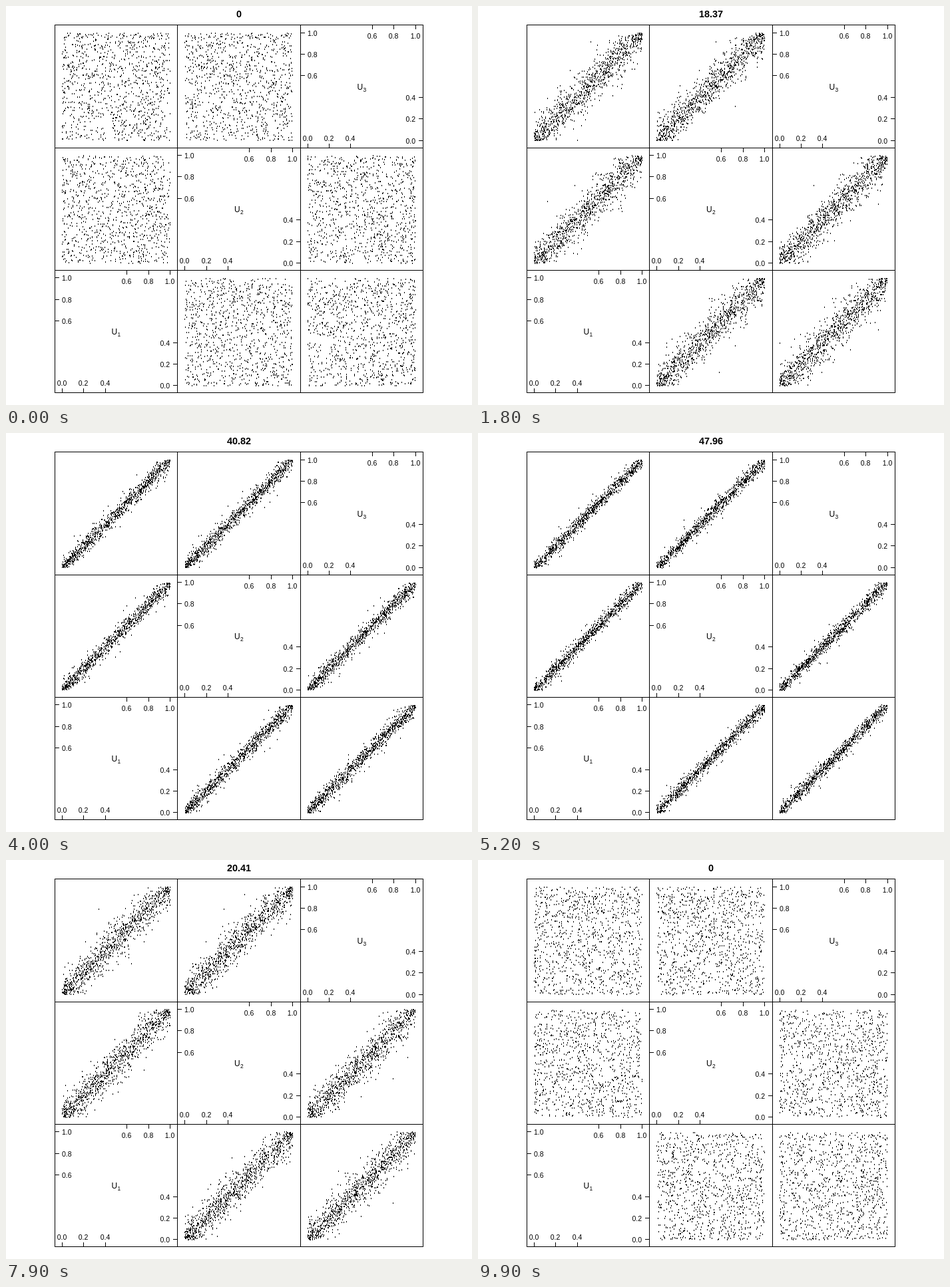
An HTML page with a canvas for the animation above (10000 ms loop, 700 px wide and 600 px high).

```html
<!DOCTYPE html>
<html>
<head>
<meta charset="utf-8">
<style>
  html, body { margin: 0; width: 100%; height: 100%; overflow: hidden; background: #fff; }
  canvas, svg { position: absolute; left: 0; top: 0; }
  text { font: 10.5px "Liberation Sans", Arial, sans-serif; }
  #title { font-size: 14.4px; font-weight: bold; text-anchor: middle; }
  .name { font-size: 12px; }
  .sub { font-size: 8.4px; }
  path { stroke: #000; stroke-linecap: square; fill: none; shape-rendering: crispEdges; }
</style>
</head>
<body>
<canvas width="700" height="600"></canvas>
<svg width="700" height="600"><path id="lines"/><text id="title" x="350" y="17"></text></svg>
<script>
const FRAMES = 100, POINTS = 1000, MAX_THETA = 50;
const LEFT = 73.4, TOP = 28.7, CELL = 184.35, SPAN = 161.9;
const svg = document.querySelector('svg');
const title = document.getElementById('title');
const ctx = document.querySelector('canvas').getContext('2d');

const edgeX = col => Math.floor(LEFT + CELL * col);
const edgeY = row => Math.floor(TOP + CELL * row);
const pixelX = (col, v) => Math.floor(LEFT + CELL * col + 11.1 + SPAN * v);
const pixelY = (row, v) => Math.floor(TOP + CELL * row + 11.5 + SPAN * (1 - v));

function addText(x, y, content, anchor = 'start', className = '') {
  const el = document.createElementNS(svg.namespaceURI, 'text');
  el.setAttribute('x', x);
  el.setAttribute('y', y);
  el.setAttribute('text-anchor', anchor);
  el.setAttribute('class', className);
  el.textContent = content;
  svg.append(el);
}

function drawGrid() {
  let d = '';
  const line = (x, y, dx, dy) => d += `M${x + 0.5} ${y + 0.5}l${dx} ${dy}`;

  for (let i = 0; i < 4; i++) {
    line(edgeX(i), edgeY(0), 0, edgeY(3) - edgeY(0));
    line(edgeX(0), edgeY(i), edgeX(3) - edgeX(0), 0);
  }
  for (let k = 0; k < 3; k++) {
    const row = 2 - k;
    const x0 = edgeX(k), x1 = edgeX(k + 1), y0 = edgeY(row), y1 = edgeY(row + 1);
    for (let i = 0; i < 6; i++) {
      const v = i / 5, label = v.toFixed(1);
      const x = pixelX(k, v), y = pixelY(row, v);
      if (i < 3) {
        line(x, y1, 0, -6);
        addText(x, y1 - 10, label, 'middle');
        line(x1, y, -6, 0);
        addText(x1 - 11, y + 4.5, label, 'end');
      } else {
        line(x, y0, 0, 6);
        addText(x, y0 + 21, label, 'middle');
        line(x0, y, 6, 0);
        addText(x0 + 11, y + 4.5, label);
      }
    }
    const cx = (x0 + x1) / 2, cy = (y0 + y1) / 2;
    addText(cx - 6.5, cy + 5, 'U', 'start', 'name');
    addText(cx + 2.5, cy + 8, k + 1, 'start', 'name sub');
  }
  document.getElementById('lines').setAttribute('d', d);
}

function seeded(seed) {
  let s = seed * 7919 + 12345;
  return () => {
    s = s + 0x6D2B79F5 | 0;
    let t = Math.imul(s ^ s >>> 15, 1 | s);
    t = t + Math.imul(t ^ t >>> 7, 61 | t) ^ t;
    return (((t ^ t >>> 14) >>> 0) + 0.5) / 2 ** 32;
  };
}

// One draw from a three-dimensional Frank copula, using a log-series mixing variable.
function frankSample(theta, random) {
  if (!theta) return [random(), random(), random()];
  const mix = 1 + Math.floor(Math.log(random()) / Math.log1p(-Math.exp(-theta * random())));
  return [0, 1, 2].map(() => {
    const t = -Math.log(random()) / mix;
    return -Math.log(Math.exp(-theta - t) - Math.expm1(-t)) / theta;
  });
}

function drawFrame(frame) {
  const theta = Math.min(frame, FRAMES - 1 - frame) * MAX_THETA / (FRAMES / 2 - 1);
  const random = seeded(frame);
  title.textContent = +theta.toFixed(2);
  ctx.clearRect(0, 0, 700, 600);
  for (let n = 0; n < POINTS; n++) {
    const u = frankSample(theta, random);
    for (let i = 0; i < 3; i++)
      for (let j = 0; j < 3; j++)
        if (i !== j) ctx.fillRect(pixelX(i, u[i]), pixelY(2 - j, u[j]), 1, 2);
  }
}

let shown = -1;
function tick(now) {
  const frame = Math.floor(now / 100) % FRAMES;
  if (frame !== shown) drawFrame(shown = frame);
  requestAnimationFrame(tick);
}

drawGrid();
drawFrame(0);
requestAnimationFrame(tick);
</script>
</body>
</html>
```
